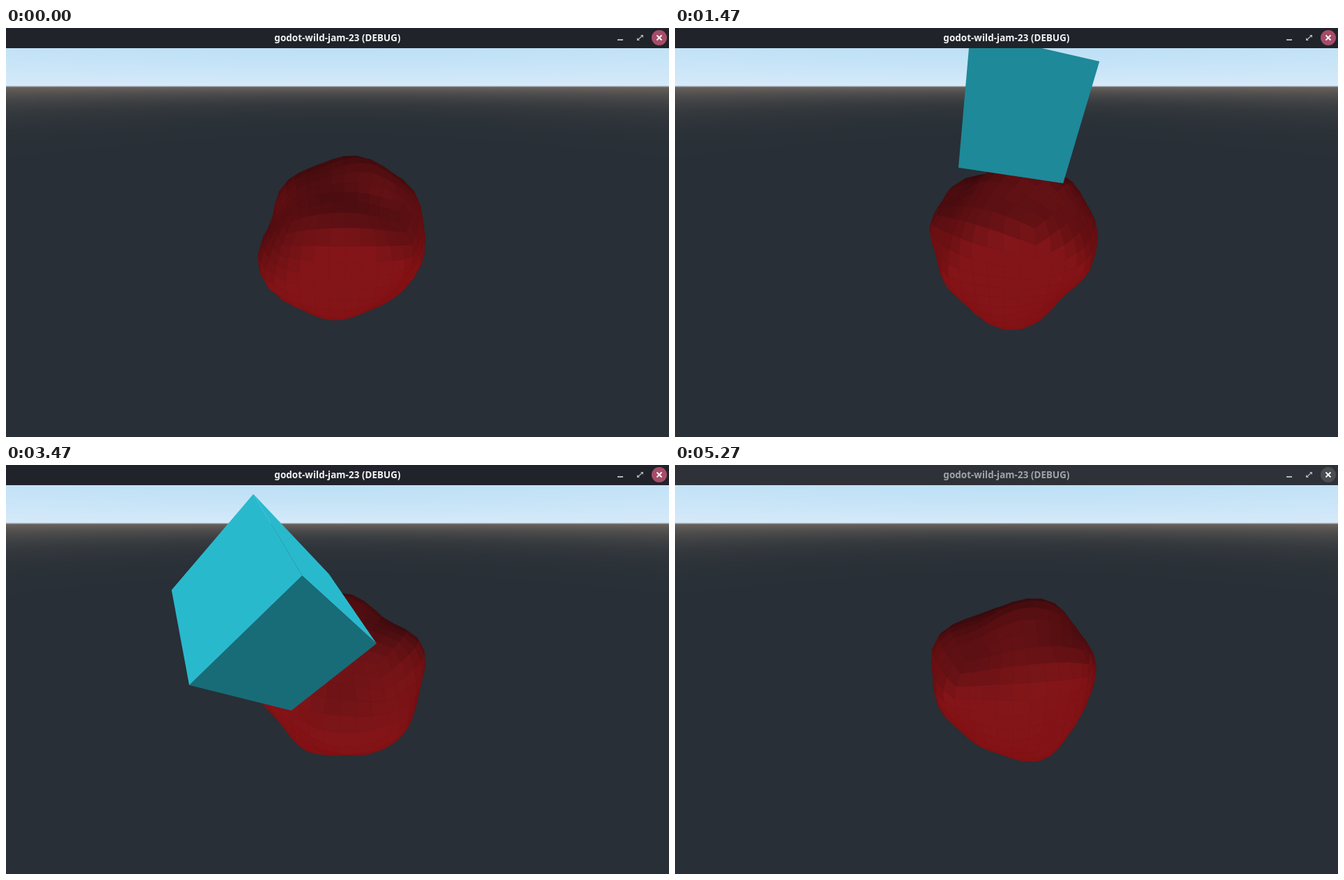
Write an HTML page with a canvas that moves like this. It is 952 by 588 pixels and loops after 5310 ms.

```html
<!DOCTYPE html>
<html lang="en">
<head>
<meta charset="utf-8">
<title>godot-wild-jam-23 (DEBUG)</title>
<style>
  html, body { margin: 0; width: 100%; height: 100%; overflow: hidden; background: #292f36; }
  canvas { position: absolute; left: 0; top: 0; }
  #bar {
    position: absolute; left: 0; top: 0; width: 952px; height: 29px;
    background: #20232a; color: #f1f2f3; --close: #a64c69;
    font: bold 13.5px/28px "Noto Sans", sans-serif; text-align: center;
  }
  #bar.blurred { background: #2e3238; color: #a0a4a9; --close: #4a4d51; }
  #bar svg { position: absolute; left: 872px; top: 0; }
</style>
</head>
<body>
<canvas id="stage" width="952" height="588"></canvas>
<div id="bar">godot-wild-jam-23 (DEBUG)
  <svg width="80" height="28">
    <path d="M6 16h8v2h-8z M39 10h4v4z M34 14v4h4z" fill="#b2b5b9"/>
    <path d="M35 17l7-6" stroke="#b2b5b9" stroke-width="1.3"/>
    <circle cx="66" cy="14" r="11" style="fill:var(--close)"/>
    <path d="M62.5 10.5l7 7m0-7l-7 7" stroke="#fff" stroke-width="1.8"/>
  </svg>
</div>
<script>
const LOOP = 5310, BLUR_AT = 5100, DROP_START = 200, DROP_END = 700, SPIN_PERIOD = 4300;
const WIDTH = 952, HEIGHT = 588, CENTER_X = 476, CENTER_Y = 308, FOCAL = 396, HORIZON = 84;
const PITCH = Math.atan((CENTER_Y - HORIZON) / FOCAL), DEGREE = Math.PI / 180;
const UP = [0, -Math.cos(PITCH), -Math.sin(PITCH)];
const PLANET = [.077, -.01, 3.8], PLANET_RADIUS = 1.06;

const stage = document.getElementById('stage'), bar = document.getElementById('bar');
const ctx = stage.getContext('2d');

// The unit cube lands, tips over and falls off: time, centre x y z, roll pitch yaw.
const cubePath = [
  [970, .064, -1.319, 2.768, 9, 27, -6.8],
  [2030, .156, -1.281, 2.673, 15.2, 40.2, -14.7],
  [2900, -.165, -1.086, 2.368, -28.5, 58.3, 6],
  [3470, -.514, -.514, 2.268, -63.5, 55.1, 30.2],
  [4000, -.975, .553, 2.17, 19.2, 57.8, -79],
  [4600, -1.5, 2.6, 2.3, 35, 60, -110]
];

const dot = (p, q) => p[0] * q[0] + p[1] * q[1] + p[2] * q[2];
const add = (p, q, k = 1) => p.map((v, i) => v + q[i] * k);
const cross = (p, q) => [0, 1, 2].map(i => p[(i + 1) % 3] * q[(i + 2) % 3] - p[(i + 2) % 3] * q[(i + 1) % 3]);
const unit = p => p.map(v => v / Math.hypot(...p));
const clamp = (v, low, high) => Math.min(high, Math.max(low, v));
const mix = (p, q, k) => p.map((v, i) => v + (q[i] - v) * k);
const project = ([x, y, z]) => [CENTER_X + FOCAL * x / z, CENTER_Y + FOCAL * y / z];

// Camera space: x right, y down, z forward. Yaw first, then pitch, then roll.
function rotation(roll, pitch, yaw) {
  const [cr, cp, cy] = [roll, pitch, yaw].map(Math.cos), [sr, sp, sy] = [roll, pitch, yaw].map(Math.sin);
  return ([x, y, z]) => {
    const x1 = x * cy + z * sy, z1 = z * cy - x * sy;
    const y1 = y * cp - z1 * sp;
    return [x1 * cr - y1 * sr, x1 * sr + y1 * cr, y * sp + z1 * cp];
  };
}

// Monotone spline through the keys; the first column is the time.
function sample(keys, t) {
  const last = keys.length - 1;
  t = clamp(t, keys[0][0], keys[last][0]);
  let i = 0;
  while (i < last - 1 && t >= keys[i + 1][0]) i++;
  const span = keys[i + 1][0] - keys[i][0], s = (t - keys[i][0]) / span;
  return keys[i].map((p, k) => {
    const slope = j => (keys[j + 1][k] - keys[j][k]) / (keys[j + 1][0] - keys[j][0]);
    const tangent = j => {
      if (j === 0) return 0;
      if (j === last) return slope(j - 1);
      const before = slope(j - 1), after = slope(j);
      return before * after > 0 ? 2 * before * after / (before + after) : 0;
    };
    const q = keys[i + 1][k], m = tangent(i) * span, n = tangent(i + 1) * span;
    return p + s * (m + s * (3 * (q - p) - 2 * m - n + s * (2 * (p - q) + m + n)));
  });
}

function seededRandom(seed) {
  return () => (seed = seed * 16807 % 2147483647) / 2147483647;
}

function fillFace(points, color, seam) {
  ctx.beginPath();
  for (const p of points) ctx.lineTo(...project(p));
  ctx.closePath();
  ctx.fillStyle = ctx.strokeStyle = color;
  ctx.fill();
  ctx.lineWidth = .7;
  if (seam) ctx.stroke();
}

// Procedural sky: colour depends only on the elevation of the view ray.
function makeBackdrop() {
  const image = new ImageData(WIDTH, HEIGHT);
  for (let y = 0, i = 0; y < HEIGHT; y++) for (let x = 0; x < WIDTH; x++, i += 4) {
    const ray = unit([x + .5 - CENTER_X, y + .5 - CENTER_Y, FOCAL]);
    const elevation = Math.asin(dot(ray, UP));
    const level = 1 - Math.abs(elevation) / (Math.PI / 2);
    const sky = mix([165, 214, 241], [214, 234, 250], level ** 11);
    const ground = mix([40, 47, 54], [108, 101, 95], level ** 50);
    image.data.set([...mix(ground, sky, clamp(elevation / .004 + .5, 0, 1)), 255], i);
  }
  return image;
}

// Six faces of a cube, each cut into n by n cells with corners in -1..1.
function cubeCells(n) {
  const cells = [];
  for (let axis = 0; axis < 3; axis++) for (const side of [-1, 1]) {
    const corner = (i, j) => {
      const p = [];
      p[axis] = side;
      p[(axis + 1) % 3] = Math.tan((i / n - .5) * Math.PI / 2);
      p[(axis + 2) % 3] = Math.tan((j / n - .5) * Math.PI / 2);
      return p;
    };
    for (let i = 0; i < n; i++) for (let j = 0; j < n; j++) {
      const corners = [corner(i, j), corner(i + 1, j), corner(i + 1, j + 1), corner(i, j + 1)];
      cells.push(side > 0 ? corners : corners.reverse());
    }
  }
  return cells;
}

const normalOf = ([p, q, r, s]) => unit(cross(add(r, p, -1), add(s, q, -1)));

// Low-poly planet: a cube grid pushed out to a sphere with random waves.
function makePlanet() {
  const random = seededRandom(23);
  const waves = Array.from({ length: 8 }, () => ({
    direction: [0, 1, 2].map(() => (random() - .5) * 12), phase: random() * 6.28
  }));
  const raise = corner => {
    const p = unit(corner);
    const bump = waves.reduce((sum, w) => sum + Math.sin(dot(p, w.direction) + w.phase), 0);
    return p.map(v => v * PLANET_RADIUS * (1 + .02 * bump));
  };
  return cubeCells(10).map(cell => cell.map(raise));
}

const backdrop = makeBackdrop(), planet = makePlanet();
const cube = cubeCells(1).map(cell => cell.map(p => p.map(v => v / 2)));

// Faces that look at the camera, far ones first.
function visibleFaces(mesh, turn, position) {
  return mesh.map(cell => {
    const points = cell.map(p => add(turn(p), position));
    return { points, normal: normalOf(points), depth: points[0][2] + points[2][2] };
  }).filter(face => dot(face.normal, face.points[0]) < 0).sort((a, b) => b.depth - a.depth);
}

function drawPlanet(t) {
  const turn = rotation(0, PITCH, t / SPIN_PERIOD * 2 * Math.PI);
  for (const { points, normal: [, ny, nz] } of visibleFaces(planet, turn, PLANET)) {
    const red = clamp(95 + 52 * ny - 25 * nz, 40, 131);
    const green = 5 + red * (.06 + .07 * Math.max(0, -nz));
    fillFace(points, `rgb(${red},${green},${green + 3})`, true);
  }
}

function drawCube(t) {
  if (t < DROP_START) return;
  const [, x, y, z, ...angles] = sample(cubePath, t);
  const fall = Math.min(1, (t - DROP_START) / (DROP_END - DROP_START));
  const position = add([x, y, z], UP, 1.2 * (1 - fall * fall));
  const turn = rotation(...angles.map(a => a * DEGREE));
  for (const { points, normal } of visibleFaces(cube, turn, position)) {
    const shade = Math.min(1, .76 + .41 * dot(normal, UP));
    fillFace(points, `rgb(${41 * shade},${185 * shade},${205 * shade})`);
  }
}

function frame() {
  const t = performance.now() % LOOP;
  ctx.putImageData(backdrop, 0, 0);
  drawPlanet(t);
  drawCube(t);
  bar.classList.toggle('blurred', t >= BLUR_AT);
  requestAnimationFrame(frame);
}
frame();
</script>
</body>
</html>
```
